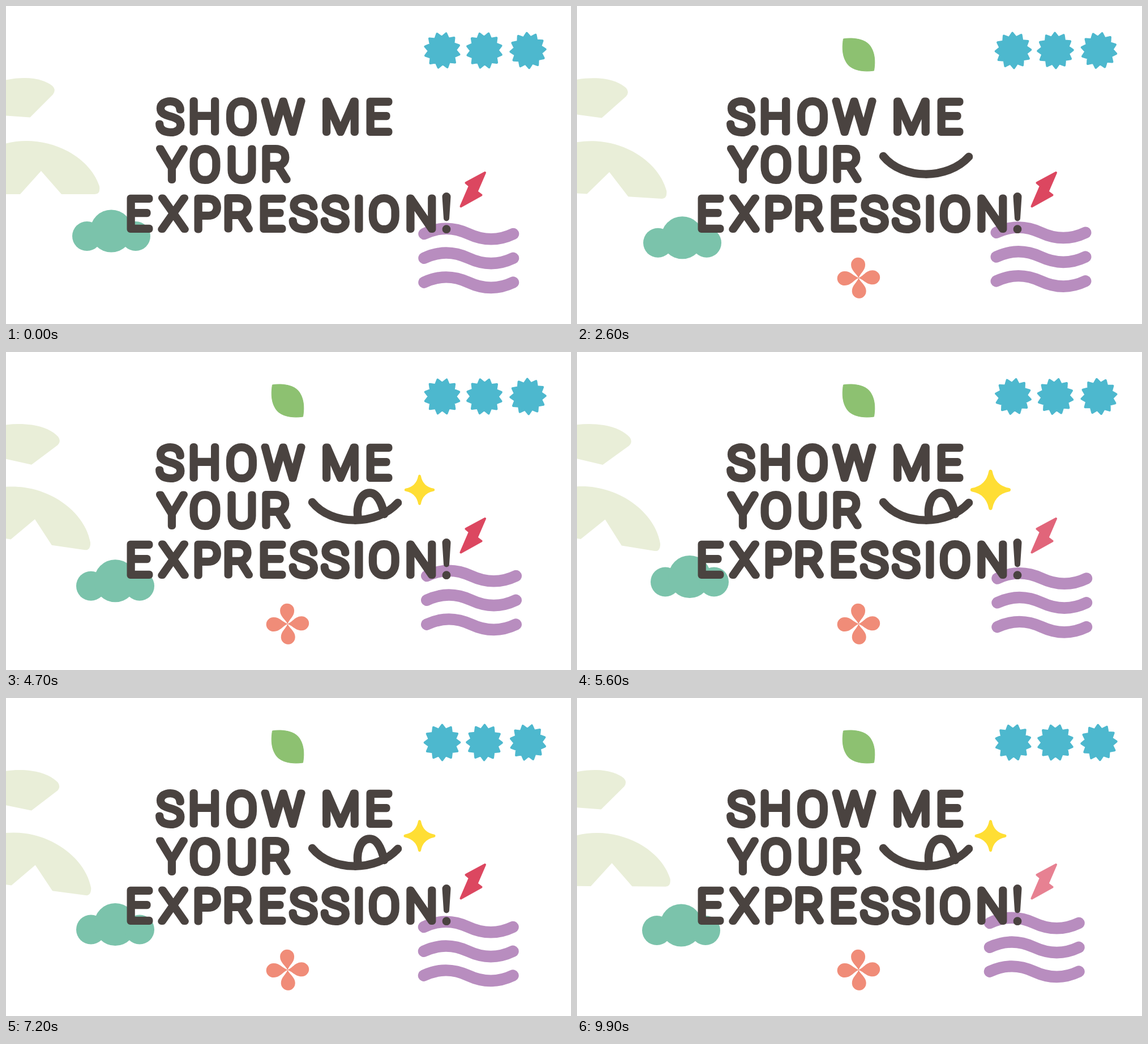
Write an HTML page that moves like this. It is 998 px wide and 561 px high and loops after 10000 ms.

```html
<!DOCTYPE html>
<html lang="en">
<head>
<meta charset="utf-8">
<title>Show me your expression!</title>
<style>
  html, body { margin: 0; width: 100%; height: 100%; overflow: hidden; background: #fff; }
  svg { display: block; width: 100%; height: 100%; }
  .lettering {
    font: 100 78px Roboto, sans-serif;
    text-anchor: middle;
    fill: #4a4340; stroke: #4a4340;
    stroke-linejoin: round; stroke-linecap: round;
  }
  .face { fill: none; stroke: #4a4340; stroke-width: 14.5; stroke-linecap: round; }
</style>
</head>
<body>
<svg viewBox="0 0 998 561" role="img" aria-label="Show me your expression!">
  <defs>
    <path id="petal" d="M0 0C-4 -9 -12.5 -13 -12.5 -23.5A12.5 12.5 0 0 1 12.5 -23.5C12.5 -13 4 -9 0 0Z"/>
    <path id="wave" d="M738.5 402C765 389.5 790 389.5 817 402S870 414.5 896 402"/>
  </defs>

  <g id="arches" fill="#e9eed8">
    <path d="M-60 160C-40 138 0 127 33 127C55 127 72 133 82 141Q89 148 83 156L42.5 196.5L-60 189Z"/>
    <path d="M-90 332C-80 270 -20 238 36 238C95 238 150 272 165 318Q167 332 157 332L98 332L62 291L25 332Z"/>
  </g>

  <g id="stars" fill="#4db8ce" stroke="#4db8ce" stroke-width="4" stroke-linejoin="round"></g>

  <g id="cloud" fill="#7bc3ab">
    <circle cx="143" cy="406" r="26"/>
    <circle cx="186" cy="397" r="37.5"/>
    <circle cx="229" cy="406" r="26"/>
  </g>

  <g id="waves" fill="none" stroke="#b88dbf" stroke-width="20.5" stroke-linecap="round">
    <use href="#wave"/>
    <use href="#wave" y="42.8"/>
    <use href="#wave" y="85.6"/>
  </g>

  <path id="leaf" fill="#8dc171" stroke="#8dc171" stroke-linejoin="round"
    d="M-27 -28C-8 -31 12 -27 20 -16C28 -5 30 10 27 28C8 31 -12 27 -20 16C-28 5 -30 -10 -27 -28Z"/>

  <g id="flower" fill="#f08c78">
    <use href="#petal"/>
    <use href="#petal" transform="rotate(90) scale(1 1.05)"/>
    <use href="#petal" transform="rotate(180)"/>
    <use href="#petal" transform="rotate(270) scale(1 1.05)"/>
  </g>

  <path id="bolt" fill="#dc4760" stroke="#dc4760" stroke-width="4" stroke-linejoin="round"
    d="M846 294L812.5 312L819 317.5L803.5 353.5L839.5 333.5L831.5 327.5Z"/>

  <path id="sparkle" fill="#ffde34" stroke="#ffde34" stroke-width="5" stroke-linejoin="round"
    d="M0 -25.5Q4 -4 25.5 0Q4 4 0 25.5Q-4 4 -25.5 0Q-4 -4 0 -25.5Z"/>

  <g class="lettering">
    <text y="222.5" x="289.5 350.5 416 489.5 540 591 657.3">SHOW ME</text>
    <text y="307.2" x="293 351.5 416.5 476.5">YOUR</text>
    <text y="393.5" x="234.3 295.5 354.5 409.8 469.3 525 581 623.5 667.8 733.3">EXPRESSION</text>
  </g>
  <g fill="#4a4340">
    <path d="M770.5 336.5a7.5 7.5 0 0 1 15 0L783 374.5a5 5 0 0 1 -10 0Z"/>
    <circle cx="778" cy="393.7" r="7.4"/>
  </g>

  <path id="smile" class="face" pathLength="1" d="M541 265C575 307 655 307 692 266"/>
  <path id="tongue" class="face" pathLength="1" d="M622 294C618 272 626 249 642 248.5C656 248 664 268 668 286"/>
</svg>

<script>
const LOOP = 10000, STEP = 100;
const $ = id => document.getElementById(id);
const set = (el, name, value) => el.setAttribute(name, value);

const ease = p => (1 - Math.cos(Math.PI * Math.min(1, Math.max(0, p)))) / 2;
const between = (t, start, end) => ease((t - start) / (end - start));

// Eased interpolation through rows of [time, ...values].
function track(keys, t) {
  const i = keys.findIndex(k => k[0] > t);
  if (i < 0) return keys[keys.length - 1].slice(1);
  if (i === 0) return keys[0].slice(1);
  const [a, b] = [keys[i - 1], keys[i]];
  const p = between(t, a[0], b[0]);
  return a.slice(1).map((v, n) => v + (b[n + 1] - v) * p);
}

const cloudDrift = [[0, 0, 0], [1400, -1, 9.5], [3800, 1, 14], [5600, 13, -0.5],
  [7200, 7, 2.5], [8700, 2, 7], [9900, -2, 4]];
const waveDrift = [[0, 0, 0], [900, -1, 6.5], [1400, -1, 7], [3800, 5.5, -11.5], [5600, 4, -2.5],
  [6400, 2, 2.5], [7200, -0.5, 2], [8700, -9, -5], [9900, -9.5, -5]];
const boltGlow = [[0, 1], [700, 1], [1400, 0.55], [2200, 1], [3000, 1], [3800, 0.92],
  [4600, 1], [5600, 0.83], [6400, 1], [8700, 1], [9900, 0.68]];
const sparkleSize = [[3700, 0], [5200, 1.27], [5700, 1.27], [7000, 1]];

// Letters are a thin skeleton thickened by a round outline to one stem weight.
function weighLetters(stem) {
  const ctx = document.createElement('canvas').getContext('2d');
  ctx.font = '100 78px Roboto, sans-serif';
  const ink = ctx.measureText('I');
  const thin = ink.actualBoundingBoxLeft + ink.actualBoundingBoxRight;
  document.querySelector('.lettering').style.strokeWidth = Math.max(2, stem - thin) + 'px';
}

function starPoints(spikes, outer, inner) {
  return Array.from({ length: spikes * 2 }, (_, i) => {
    const r = i % 2 ? inner : outer, a = Math.PI * i / spikes;
    return `${(r * Math.sin(a)).toFixed(2)},${(-r * Math.cos(a)).toFixed(2)}`;
  }).join(' ');
}

const stars = [[770.5, 13], [845, 14], [922, -4]].map(([x, phase]) => {
  const el = document.createElementNS('http://www.w3.org/2000/svg', 'polygon');
  set(el, 'points', starPoints(12, 30.8, 23.5));
  $('stars').append(el);
  return { el, x, phase };
});

function place(id, x, y, scale, angle = 0) {
  set($(id), 'transform', `translate(${x} ${y}) rotate(${angle}) scale(${scale})`);
  set($(id), 'visibility', scale > 0.001 ? 'visible' : 'hidden');
}

function trace(id, part) {
  set($(id), 'stroke-dasharray', part < 1 ? `${part} 2` : 'none');
  set($(id), 'visibility', part > 0.001 ? 'visible' : 'hidden');
}

function draw(t) {
  const swing = t < 6000 ? between(t, 0, 6000) : 1 - between(t, 6000, 10400);
  set($('arches'), 'transform', `rotate(${9.2 * swing} 28 216)`);

  for (const { el, x, phase } of stars)
    set(el, 'transform', `translate(${x} 78.5) rotate(${phase - t * 0.006})`);

  set($('cloud'), 'transform', `translate(${track(cloudDrift, t)})`);
  set($('waves'), 'transform', `translate(${track(waveDrift, t)})`);
  set($('bolt'), 'opacity', track(boltGlow, t)[0]);

  place('leaf', 497.5, 86, between(t, 500, 1610));
  place('flower', 497.4, 479.7, between(t, 800, 1860), -2);
  place('sparkle', 730.5, 243.2, track(sparkleSize, t)[0]);

  trace('smile', between(t, 500, 1775));
  trace('tongue', between(t, 2800, 4450));
}

weighLetters(15.2);
const start = performance.now();
function tick() {
  const t = (performance.now() - start) % LOOP;
  draw(Math.floor(t / STEP) * STEP);
  requestAnimationFrame(tick);
}
tick();
</script>
</body>
</html>
```
